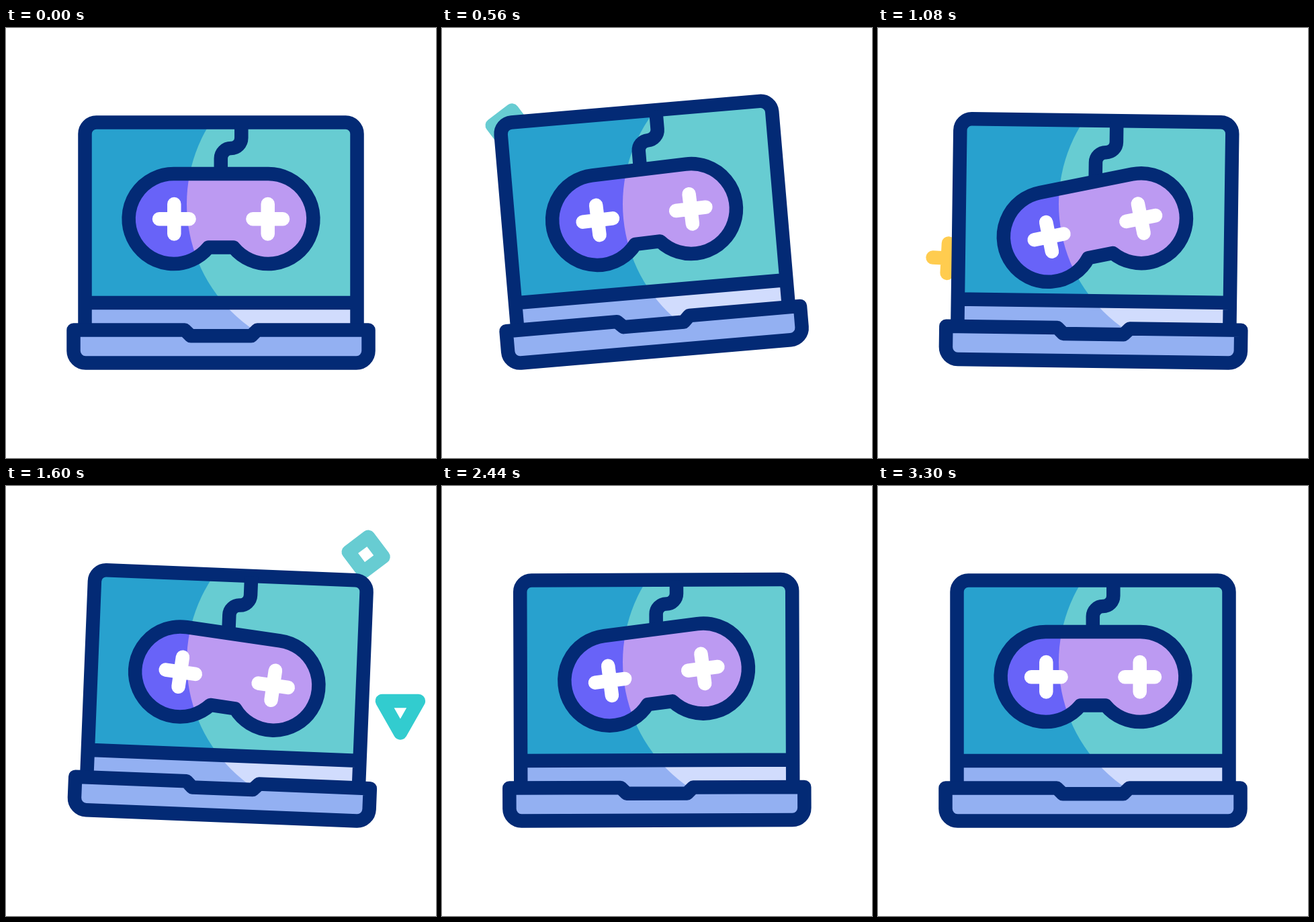
An HTML page with a canvas that plays this animation: 640 by 640 pixels, repeating every 3.6 s.

```html
<!DOCTYPE html>
<html lang="en">
<head>
<meta charset="utf-8">
<title>Rocking laptop</title>
<style>
  html, body { margin: 0; width: 100%; height: 100%; overflow: hidden; background: #fff; }
  canvas { display: block; width: 640px; height: 640px; }
</style>
</head>
<body>
<canvas id="stage" width="640" height="640"></canvas>
<script>
const LOOP = 3600, REST = 3300, CENTRE = 320, FLIGHT = 380;
const INK = '#032a75', TEAL = '#67ccd2', BLUE = '#93b0f2';
const ctx = document.getElementById('stage').getContext('2d');

const lens = new Path2D();
lens.arc(495, 262, 226, 0, 7);
const screen = new Path2D('M117.5 409V157.5a17 17 0 0 1 17 -17H505.5a17 17 0 0 1 17 17V409Z');
const hinge = new Path2D('M117.5 409H522.5V460H117.5Z');
const lid = new Path2D('M117.5 449V157.5a17 17 0 0 1 17 -17H505.5a17 17 0 0 1 17 17V449M117.5 409H522.5');
const base = new Path2D('M100.5 449.5H266L275 458.3H365L374 449.5H539.5V480.5a18 18 0 0 1 -18 18H118.5a18 18 0 0 1 -18 -18Z');
const pad = new Path2D('M250 217H390A67 67 0 1 1 338.6 326.5H301.4A67 67 0 1 1 250 217Z');

const square = { path: new Path2D('M-18.5 -18.5H18.5V18.5H-18.5Z'), color: TEAL, angle: -37 };
const plus = { path: new Path2D('M-22.3 0H22.3M0 -22.3V22.3'), color: '#ffcc4f', angle: 3 };
const triangle = { path: new Path2D('M-27 -16H27L0 31.5Z'), color: '#32cccf', angle: 0 };

// Each shape flies outwards: when it starts and where it ends
const bits = [
  { shape: square, start: 480, x: 40, y: 101 },
  { shape: plus, start: 610, x: 591, y: 240 },
  { shape: plus, start: 1000, x: 44, y: 349 },
  { shape: square, start: 1440, x: 564, y: 73 },
  { shape: triangle, start: 1440, x: 622, y: 338 },
  { shape: triangle, start: 1600, x: 55, y: 360 },
  { shape: plus, start: 1980, x: 599, y: 242 },
  { shape: square, start: 2060, x: 59, y: 220 }
];

const wave = cycles => Math.cos(cycles * 2 * Math.PI);

// Slow tip to the left, then a rocking that dies away
function lean(t) {
  const tip = 550, settle = 2250, s = t - tip;
  if (s < 0) return -2.5 * (1 - wave(t / tip / 2));
  if (s > settle) return 0;
  return -2.5 * (1 + wave(s / settle / 2)) * wave(s / 308.5);
}

// The controller sways and bobs on its cable, fading in and out
const fade = t => t < REST ? 1 - (2 * t / REST - 1) ** 4 : 0;
const swing = t => 13 * fade(t) * wave(t / 715 - 0.065);
const bob = t => 16 * fade(t) * wave((t - 1088) / 594);

function turn(deg, x, y) {
  ctx.translate(x, y);
  ctx.rotate(deg * Math.PI / 180);
  ctx.translate(-x, -y);
}

function line(path, color) {
  ctx.strokeStyle = color;
  ctx.stroke(path);
}

// The light area stays fixed on the stage while shapes move under it
function shade(path, dark, light) {
  ctx.fillStyle = dark;
  ctx.fill(path);
  const pose = ctx.getTransform();
  ctx.save();
  ctx.resetTransform();
  ctx.clip(lens);
  ctx.setTransform(pose);
  ctx.fillStyle = light;
  ctx.fill(path);
  ctx.restore();
}

function drawBit({ shape, start, x, y }, t) {
  const p = (t - start) / FLIGHT;
  if (p <= 0 || p >= 1) return;
  const reach = 1 - 0.35 * (1 - p) ** 2;
  const size = Math.min(1, p / 0.15, (1 - p) / 0.22);
  ctx.save();
  ctx.translate(CENTRE + (x - CENTRE) * reach, CENTRE + (y - CENTRE) * reach);
  ctx.rotate(shape.angle * Math.PI / 180);
  ctx.scale(size, size);
  line(shape.path, shape.color);
  ctx.restore();
}

function cable(dy) {
  const s = dy > 0 ? dy * 0.55 : dy;
  return new Path2D(`M350.3 141V${163.5 + s}a15.5 15.5 0 0 1 -15.5 15.5a15 15 0 0 0 -15 15V${217 + dy}`);
}

function draw(t) {
  ctx.resetTransform();
  ctx.fillStyle = '#fff';
  ctx.fillRect(0, 0, 640, 640);
  ctx.lineWidth = 20.5;
  ctx.lineJoin = ctx.lineCap = 'round';
  bits.forEach(b => drawBit(b, t));

  const tilt = lean(t), dy = bob(t);
  turn(tilt, tilt < 0 ? 118 : 522, 508.5);
  shade(screen, '#28a1ce', TEAL);
  shade(hinge, BLUE, '#d1dcfd');
  ctx.fillStyle = BLUE;
  ctx.fill(base);
  ctx.lineCap = 'butt';
  line(lid, INK);
  line(base, INK);
  line(cable(dy), INK);

  ctx.translate(0, dy);
  turn(swing(t), CENTRE, 284);
  shade(pad, '#6863f8', '#bc9af2');
  line(pad, INK);
  ctx.lineCap = 'round';
  ctx.translate(250.3, 284.2);
  line(plus.path, '#fff');
  ctx.translate(139.4, 0);
  line(plus.path, '#fff');
}

const begin = performance.now();
function tick() {
  draw((performance.now() - begin) % LOOP);
  requestAnimationFrame(tick);
}
tick();
</script>
</body>
</html>
```
